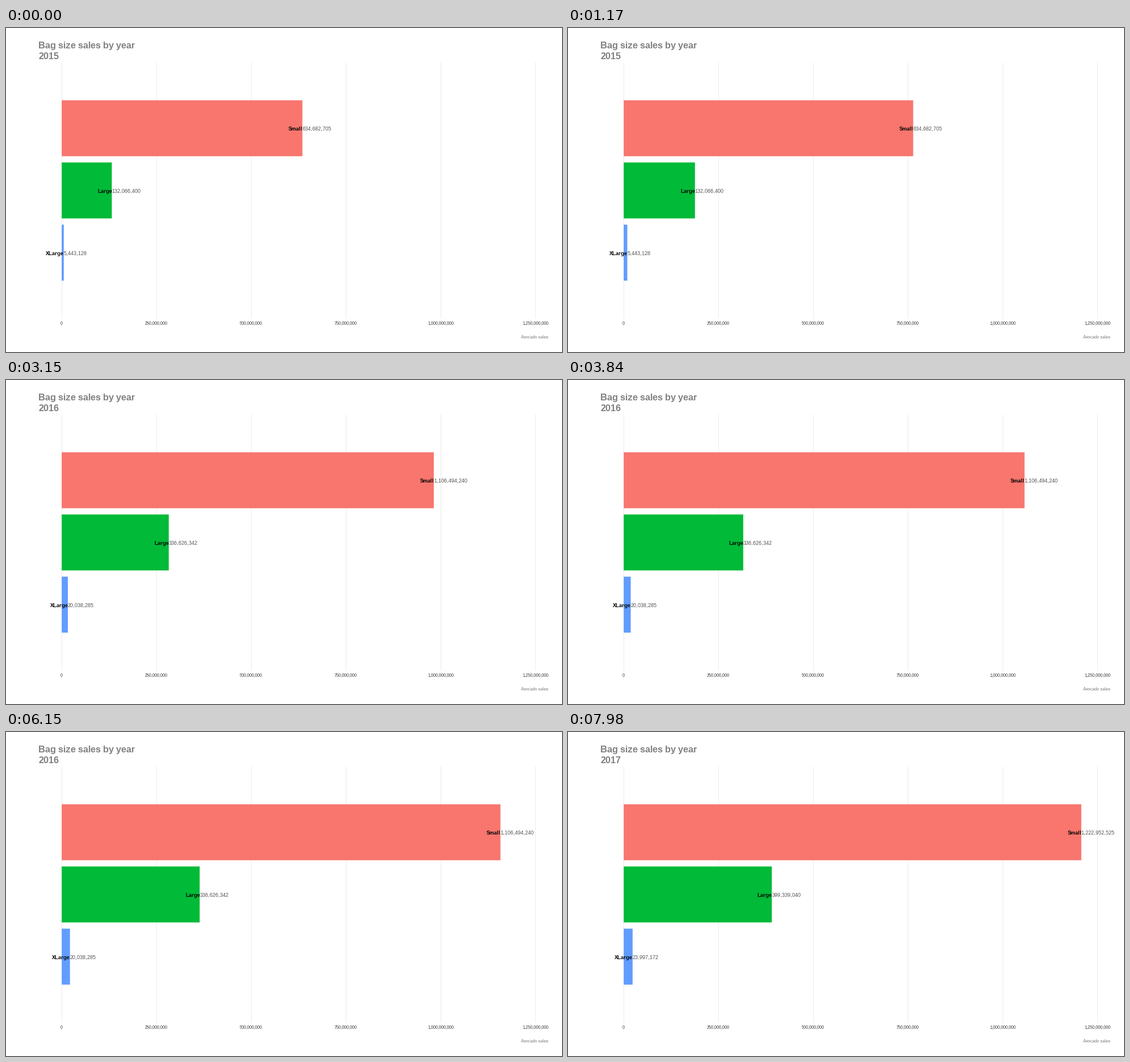
Recreate the animation shown at these times as a matplotlib script. Size 980 by 572 pixels, loop 8000 ms.

```python
import matplotlib.pyplot as plt
from matplotlib.animation import FuncAnimation
from matplotlib.patches import Rectangle

W, H, DPI = 980, 572, 100
X0, PX_PER_UNIT = 98.2, 0.6684e-6
ROW_TOP, ROW_GAP, BAR_H = 127.6, 109.8, 98.8
INTERVAL, LOOP = 20, 8000
STEP_MS = 30          # the bars advance once per step
SPAN = 143            # steps from one year to the next

YEARS = [2015, 2016, 2017]
BARS = [  # name, colour, sales per year
    ("Small", "#F8766D", (634682705, 1106494240, 1222952525)),
    ("Large", "#00BA38", (132066400, 336626342, 399339040)),
    ("XLarge", "#619CFF", (5443128, 20038285, 23997172)),
]

plt.rcParams.update({
    "font.family": "Liberation Sans",
    "text.hinting": "native",
    "text.hinting_factor": 1,
})
fig = plt.figure(figsize=(W / DPI, H / DPI), dpi=DPI, facecolor="white")
ax = fig.add_axes([0, 0, 1, 1])
ax.set_xlim(0, W)
ax.set_ylim(H, 0)
ax.axis("off")


def label(x, y, s, px, color, **kw):
    return ax.text(x, y, s, fontsize=px * 72 / DPI, color=color,
                   va="baseline", zorder=3, **kw)


def box(x, y, w, h, color, z):
    return ax.add_patch(Rectangle((x, y), w, h, fc=color, lw=0,
                                  snap=False, zorder=z))


for amount in range(0, 1_250_000_001, 250_000_000):
    x = X0 + amount * PX_PER_UNIT
    box(x - 0.15, 61, 0.3, 452, "#BEBEBE", 1)
    label(x - 0.5, 524, f"{amount:,}", 8, "#404040", ha="center")

label(57, 36, "Bag size sales by year", 16, "#7F7F7F", weight="bold")
year = label(57, 55, "2015", 16, "#7F7F7F", weight="bold")
label(956, 548, "Avocado sales", 8, "#7F7F7F", ha="right")

rows = []
for i, (name, color, sales) in enumerate(BARS):
    top = ROW_TOP + i * ROW_GAP
    base = round(top + 53.7)
    rect = box(X0, top, 1, BAR_H, color, 2)
    tag = label(X0, base, name, 9, "black", ha="right", weight="bold")
    value = label(X0, base, "", 9, "#4D4D4D", ha="left")
    rows.append((rect, tag, value, sales))


def update(frame):
    step = (frame * INTERVAL + INTERVAL // 2) // STEP_MS
    k, part = divmod(step, SPAN)
    t = part / SPAN
    nearest = k + (t >= 0.5)
    year.set_text(str(YEARS[nearest]))
    for rect, tag, value, sales in rows:
        amount = sales[k] + (sales[k + 1] - sales[k]) * t
        edge = X0 + amount * PX_PER_UNIT
        rect.set_width(edge - X0)
        tag.set_x(edge + 0.5)
        value.set_x(edge)
        value.set_text(f"{sales[nearest]:,}")
    return []


anim = FuncAnimation(fig, update, frames=LOOP // INTERVAL, interval=INTERVAL,
                     init_func=lambda: update(0), repeat=True, repeat_delay=0)
plt.show()
```
